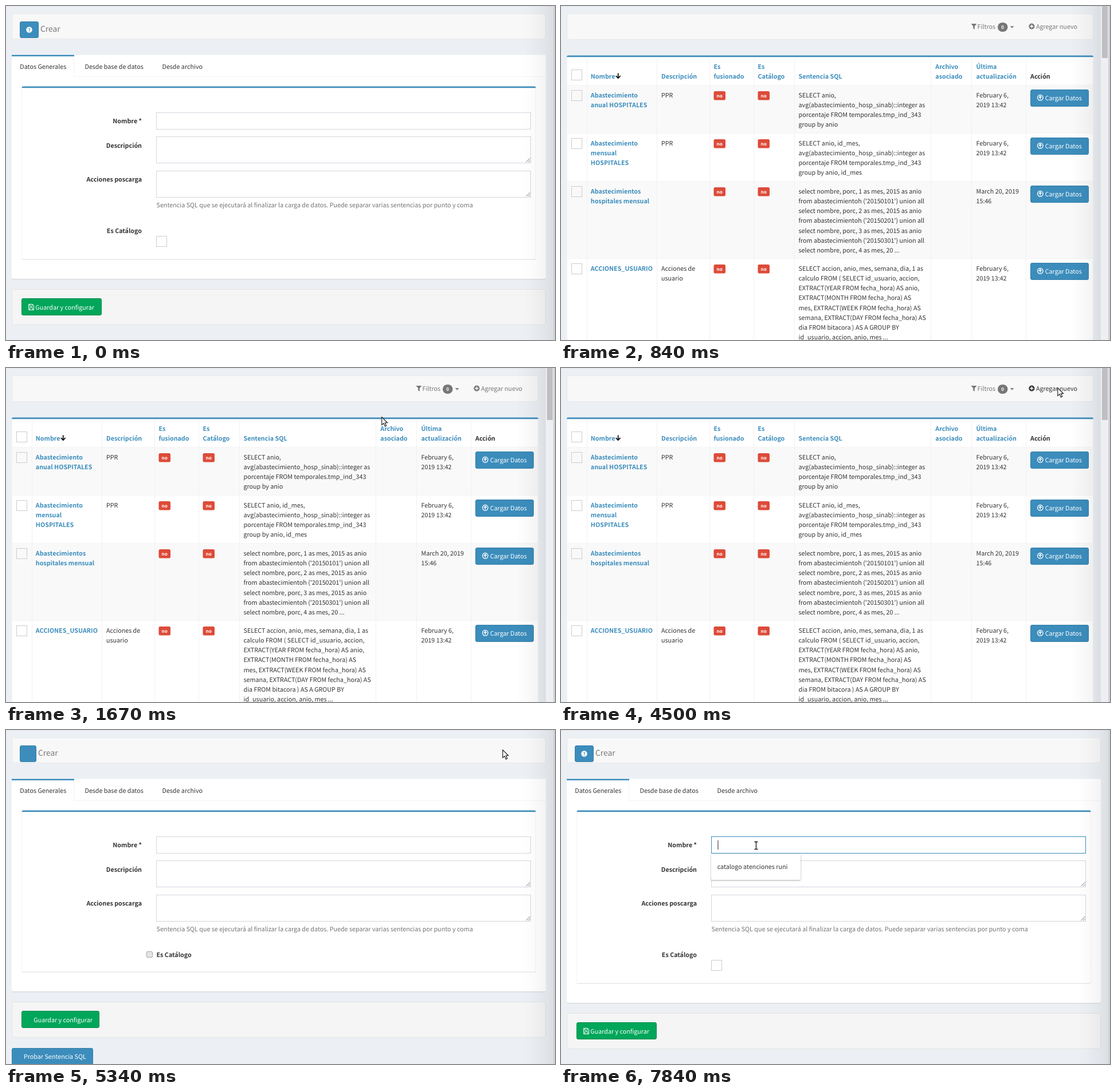
These frames come from a looping animation (958 px wide and 584 px high, 8000 ms). An HTML page:

```html
<!DOCTYPE html>
<html lang="es">
<head>
<meta charset="utf-8">
<title>Crear</title>
<style>
html, body { margin: 0; width: 100%; height: 100%; overflow: hidden; background: #ecf0f5; }
svg { display: block; width: 958px; height: 584px; }
text {
  font: 10.74px "Noto Sans CJK SC", "Noto Sans CJK JP", "Noto Sans CJK", "Noto Sans", sans-serif;
  fill: #333; text-rendering: geometricPrecision;
}
.b { font-weight: 700; }
.link { fill: #3c8dbc; font-weight: 700; }
.white { fill: #fff; }
.mute { fill: #737373; }
.big { font-size: 13.8px; fill: #777; }
.tiny { font-size: 8.1px; font-weight: 700; fill: #fff; }
.end { text-anchor: end; }
.mid { text-anchor: middle; }
</style>
</head>
<body>
<svg id="stage" viewBox="0 0 958 584" xmlns="http://www.w3.org/2000/svg"></svg>
<script>
const BLUE = '#3c8dbc', LINE = '#f4f4f4', FIELD = '#d2d6de';
const stage = document.getElementById('stage');
const $ = id => document.getElementById(id);

// Drawing helpers; boxes are given by their outer pixel edges
const rect = (x, y, x2, y2, fill, more = '') =>
  `<rect x="${x}" y="${y}" width="${x2 - x}" height="${y2 - y}" fill="${fill}" ${more}/>`;
const box = (x, y, x2, y2, fill, edge, r = 0, more = '') =>
  rect(x + .5, y + .5, x2 - .5, y2 - .5, fill, `stroke="${edge}" rx="${r}" ${more}`);
const path = (d, fill, more = '') => `<path d="${d}" fill="${fill}" ${more}/>`;
const stroke = (d, color, w = 1) => path(d, 'none', `stroke="${color}" stroke-width="${w}"`);
const text = (x, y, s, cls = '') => `<text x="${x}" y="${y}" class="${cls}">${s}</text>`;
const lines = (x, y, list, cls) => list.map((s, i) => text(x, y + i * 17.2, s, cls)).join('');
const group = (id, s, more = '') => `<g id="${id}" ${more}>${s}</g>`;
const at = (x, y, s) => `<g transform="translate(${x} ${y})">${s}</g>`;
const shade = (x, x2) => rect(x, 0, x2, 584, 'url(#shade)');

const backdrop = rect(0, 0, 958, 584, '#ecf0f5') + rect(0, 0, 958, 1, '#e1e5ea');

function textarea(y) {
  return box(262, y, 916, y + 47, '#fff', FIELD) +
    stroke(`M907.5 ${y + 45}l7 -7M911.5 ${y + 45}l3 -3`, '#777');
}

function form(ready) {
  const dy = ready ? 0 : -20;
  const bx = ready ? 57 : 53;
  let s = backdrop +
    box(10, 13, 942, 58, '#f8f8f8', '#e7e7e7', 3) +
    box(24, 27, bx, 56, BLUE, '#367fa9', 2.5) +
    text(bx + 3, 45, 'Crear', 'big') +
    rect(10, 86, 942, 478.5 + dy, '#d9dde1', 'rx="2"') +
    rect(10, 85.5, 942, 477 + dy, '#fff', 'rx="2"') +
    rect(119, 123, 942, 124, LINE) + rect(118, 88, 119, 123, LINE) +
    rect(10, 85.5, 119, 88, BLUE) +
    text(24.3, 110, 'Datos Generales') +
    text(137.5, 110, 'Desde base de datos') +
    text(272.5, 110, 'Desde archivo') +
    rect(27, 141, 925, 444 + dy, '#e8e8e8', 'rx="3"') +
    rect(27.5, 141, 924.5, 442.6 + dy, '#fff', 'rx="2.5"') +
    path('M27.5 143.2V143Q27.5 140.6 30 140.6H922Q924.5 140.6 924.5 143V143.2Z', BLUE) +
    text(237, 205, 'Nombre *', 'b end') +
    text(237, 247.5, 'Descripción', 'b end') +
    text(237, 307, 'Acciones poscarga', 'b end') +
    box(262, 186, 916, 216, '#fff', FIELD) +
    textarea(228) + textarea(288) +
    text(262.5, 352, 'Sentencia SQL que se ejecutará al finalizar la carga de datos. Puede separar varias sentencias por punto y coma', 'mute') +
    box(10, 495 + dy, 942, 558 + dy, '#f5f5f5', '#e3e3e3', 3) +
    box(27, 511 + dy, ready ? 167 : 163, 541 + dy, '#00a65a', '#008d4c', 2.5) +
    text(ready ? 51.3 : 48.3, 530.5 + dy, 'Guardar y configurar', 'white');
  if (ready) {
    s += '<circle cx="40.5" cy="41.5" r="5.2" fill="#fff"/>' +
      `<text x="40.5" y="44.6" class="tiny mid" style="fill:${BLUE}">?</text>` +
      text(237, 397, 'Es Catálogo', 'b end') +
      box(262, 402, 281, 421, '#fff', '#ccc') +
      stroke('M39.5 521.5H46.5L48.5 523.5V531.5H39.5ZM41.5 521.5V525H46V521.5M41.5 531.5V527.5H46.5V531.5', '#fff');
  } else {
    s += box(245, 387, 256, 398, '#e4e4e4', '#a5a5a5', 1.5) +
      text(262.5, 397, 'Es Catálogo', 'b') +
      box(10, 556, 152, 586, BLUE, '#367fa9', 2.5) +
      text(31, 574.5, 'Probar Sentencia SQL', 'white');
  }
  return s + shade(902, 955);
}

const rows = [
  [138, 222, ['Abastecimiento', 'anual HOSPITALES'], ['PPR'],
    ['SELECT anio,', 'avg(abastecimiento_hosp_sinab)::integer as', 'porcentaje FROM temporales.tmp_ind_343', 'group by anio'],
    ['February 6,', '2019 13:42']],
  [222, 306, ['Abastecimiento', 'mensual', 'HOSPITALES'], ['PPR'],
    ['SELECT anio, id_mes,', 'avg(abastecimiento_hosp_sinab)::integer as', 'porcentaje FROM temporales.tmp_ind_343', 'group by anio, id_mes'],
    ['February 6,', '2019 13:42']],
  [306, 441, ['Abastecimientos', 'hospitales mensual'], [],
    ['select nombre, porc, 1 as mes, 2015 as anio', "from abastecimientoh ('20150101') union all",
      'select nombre, porc, 2 as mes, 2015 as anio', "from abastecimientoh ('20150201') union all",
      'select nombre, porc, 3 as mes, 2015 as anio', "from abastecimientoh ('20150301') union all",
      'select nombre, porc, 4 as mes, 20 ...'],
    ['March 20, 2019', '15:46']],
  [441, 584, ['ACCIONES_USUARIO'], ['Acciones de', 'usuario'],
    ['SELECT accion, anio, mes, semana, dia, 1 as', 'calculo FROM ( SELECT id_usuario, accion,',
      'EXTRACT(YEAR FROM fecha_hora) AS anio,', 'EXTRACT(MONTH FROM fecha_hora) AS',
      'mes, EXTRACT(WEEK FROM fecha_hora) AS', 'semana, EXTRACT(DAY FROM fecha_hora) AS',
      'dia FROM bitacora ) AS A GROUP BY', 'id_usuario, accion, anio, mes ...'],
    ['February 6,', '2019 13:42']]
];

function tableRow([y, y2, name, desc, sql, date], i) {
  const base = y + 21.7, fill = i % 2 ? '#fff' : '#f9f9f9';
  const badge = x => rect(x, y + 11, x + 20.5, y + 26.5, '#dd4b39', 'rx="2.5"') +
    text(x + 10.2, y + 21.6, 'no', 'tiny mid');
  return rect(11, y, 928, y2, fill, `id="row${i}"`) + rect(11, y, 928, y + 1, LINE) +
    box(18, y + 9, 37, y + 28, fill, '#ccc') +
    lines(51.8, base, name, 'link') + lines(175, base, desc) +
    badge(266.5) + badge(343.5) +
    lines(414.5, base, sql) + lines(724.5, base, date) +
    box(819, y + 8, 921, y + 38, BLUE, '#367fa9', 2.5) +
    `<circle cx="836.3" cy="${y + 22.3}" r="4.8" fill="none" stroke="#fff" stroke-width="1.3"/>` +
    stroke(`M836.3 ${y + 25.3}v-5.5M833.7 ${y + 22.3}l2.6 -2.6l2.6 2.6`, '#fff', 1.4) +
    text(844.7, y + 27.2, 'Cargar Datos', 'white');
}

function list() {
  const head = (x, ...s) => lines(x, s.length > 1 ? 109.5 : 126.7, s, 'link');
  const filter = path('M715.5 31H725.5L721.8 35.2V41L719.2 39V35.2Z', 'currentColor') +
    text(726.6, 40, 'Filtros') + rect(762, 29, 779.5, 45, '#777', 'rx="8"') +
    text(770.7, 39.9, '0', 'tiny mid') + path('M783.8 35.3H790.5L787.2 38.8Z', 'currentColor');
  const add = '<circle cx="821.4" cy="35.6" r="5.1" fill="currentColor"/>' +
    stroke('M818.4 35.6h6M821.4 32.6v6', '#f8f8f8', 1.6) + text(828.9, 40, 'Agregar nuevo');
  return backdrop +
    box(10, 13, 929, 59, '#f8f8f8', '#e7e7e7', 3) +
    group('filter', filter) + group('add', add) +
    rect(10, 87, 929, 584, LINE, 'rx="3"') + rect(11, 88, 928, 584, '#fff') +
    path('M10 89.2V89Q10 86.6 12.5 86.6H926.5Q929 86.6 929 89V89.2Z', BLUE) +
    box(18, 111, 37, 130, '#fff', '#ccc') +
    head(51.8, 'Nombre') + stroke('M99.7 117.5V126M95.8 122.2L99.7 126.2L103.6 122.2', '#111', 1.8) +
    head(175, 'Descripción') + head(266.5, 'Es', 'fusionado') + head(343.5, 'Es', 'Catálogo') +
    head(414.5, 'Sentencia SQL') + head(653.3, 'Archivo', 'asociado') +
    head(724.5, 'Última', 'actualización') + text(819, 126.7, 'Acción', 'b') +
    rows.map(tableRow).join('') +
    [45, 167, 259, 336, 407, 645, 716, 811].map(x => rect(x, 89, x + 1, 584, '#f1f1f1')).join('') +
    shade(889, 942) + rect(942, 0, 955, 584, '#eeeff2') + rect(944, 0, 954, 91, '#bfbfc1');
}

const blank = rect(0, 0, 958, 584, '#242b32') + rect(0, 580, 958, 584, '#20282e');

const focus = rect(262.5, 186.5, 915.5, 215.5, 'none', 'id="ring"') +
  rect(273.5, 193, 274.5, 209, '#222') +
  rect(262, 217, 418, 262, '#fff', 'rx="2" filter="url(#drop)"') +
  text(272.7, 243, 'catalogo atenciones runi');

const cursors =
  group('arrow', path('M.8 .8V14.6L4 11.6L6.4 17L8.7 16L6.4 10.8H10.6Z', '#fff', 'stroke="#111" stroke-width="1.1"')) +
  group('hand', path('M4.5 7.5L1.3 5.6Q.3 4.2 1.8 3.5L6 5.2V1.5Q7 0 8 1.5V5Q12.8 5.4 13 7.5V10.5L12 13.5H5.8L2 9.6Q1.2 8 2.6 7.6Z', '#fff', 'stroke="#111"') +
    stroke('M8.5 8V11M10.5 8V11', '#111', .7)) +
  group('beam', stroke('M.5 1.5H2.5L3.5 2.5L4.5 1.5H6.5M3.5 2V14M.5 14.5H2.5L3.5 13.5L4.5 14.5H6.5', '#fff', 2.6) +
    stroke('M.5 1.5H2.5L3.5 2.5L4.5 1.5H6.5M3.5 2V14M.5 14.5H2.5L3.5 13.5L4.5 14.5H6.5', '#111', 1.3));

stage.innerHTML = `<defs>
  <linearGradient id="shade"><stop offset="0" stop-opacity="0"/><stop offset=".35" stop-opacity=".018"/>
    <stop offset=".75" stop-opacity=".045"/><stop offset="1" stop-opacity=".075"/></linearGradient>
  <filter id="drop" x="-10%" y="-20%" width="120%" height="150%">
    <feDropShadow dx="0" dy="1" stdDeviation="1.5" flood-opacity=".35"/></filter></defs>` +
  group('form', form(true)) + group('raw', form(false)) + group('list', list()) + group('blank', blank) +
  group('focus', focus) + group('cursor', cursors) + rect(955, 0, 958, 584, '#d2d3d6');

const scenes = [[0, 'form'], [500, 'blank'], [840, 'list'], [5340, 'raw'], [5500, 'form']];
// Pointer stops: time, shape, left, top
const stops = [
  [0, ''], [1340, 'arrow', 505, 222], [1500, 'arrow', 590, 138], [1670, 'arrow', 655, 85],
  [2000, 'hand', 783, 31], [2170, 'hand', 792, 35], [2340, 'arrow', 806, 29],
  [2500, 'hand', 840, 30], [2670, 'hand', 860, 34.5], [2840, 'hand', 862, 34],
  [4500, 'arrow', 866, 34], [6840, 'arrow', 778, 72], [7000, 'beam', 459, 185],
  [7170, 'beam', 356, 195], [7340, 'beam', 337, 194]
];
const ringSteps = [[0, 0], [7500, .3], [7670, .75], [7840, 1]];

const current = (list, t) => list.filter(s => s[0] <= t).pop();
const show = (id, on) => $(id).style.display = on ? '' : 'none';
const mix = (a, b, k) => `rgb(${a.map((v, i) => Math.round(v + (b[i] - v) * k))})`;
const tint = (id, on) => {
  const c = on ? '#333' : '#777';
  $(id).style.color = c;
  $(id).querySelector('text').style.fill = c;
};

function draw(t) {
  const scene = current(scenes, t)[1];
  ['form', 'raw', 'list', 'blank'].forEach(id => show(id, id === scene));

  const [, shape, x, y] = current(stops, t);
  ['arrow', 'hand', 'beam'].forEach(id => show(id, id === shape));
  if (shape) $('cursor').setAttribute('transform', `translate(${x} ${y})`);

  $('row1').setAttribute('fill', t >= 1340 && t < 1500 ? '#f5f5f5' : '#fff');
  $('row0').setAttribute('fill', t >= 1500 && t < 1670 ? '#f5f5f5' : '#f9f9f9');
  tint('filter', t >= 2000 && t < 2500);
  tint('add', t >= 2500);

  show('focus', t >= 7500);
  $('ring').setAttribute('stroke', mix([210, 214, 222], [60, 141, 188], current(ringSteps, t)[1]));
}

function tick() {
  draw(performance.now() % 8000);
  requestAnimationFrame(tick);
}
tick();
</script>
</body>
</html>
```
